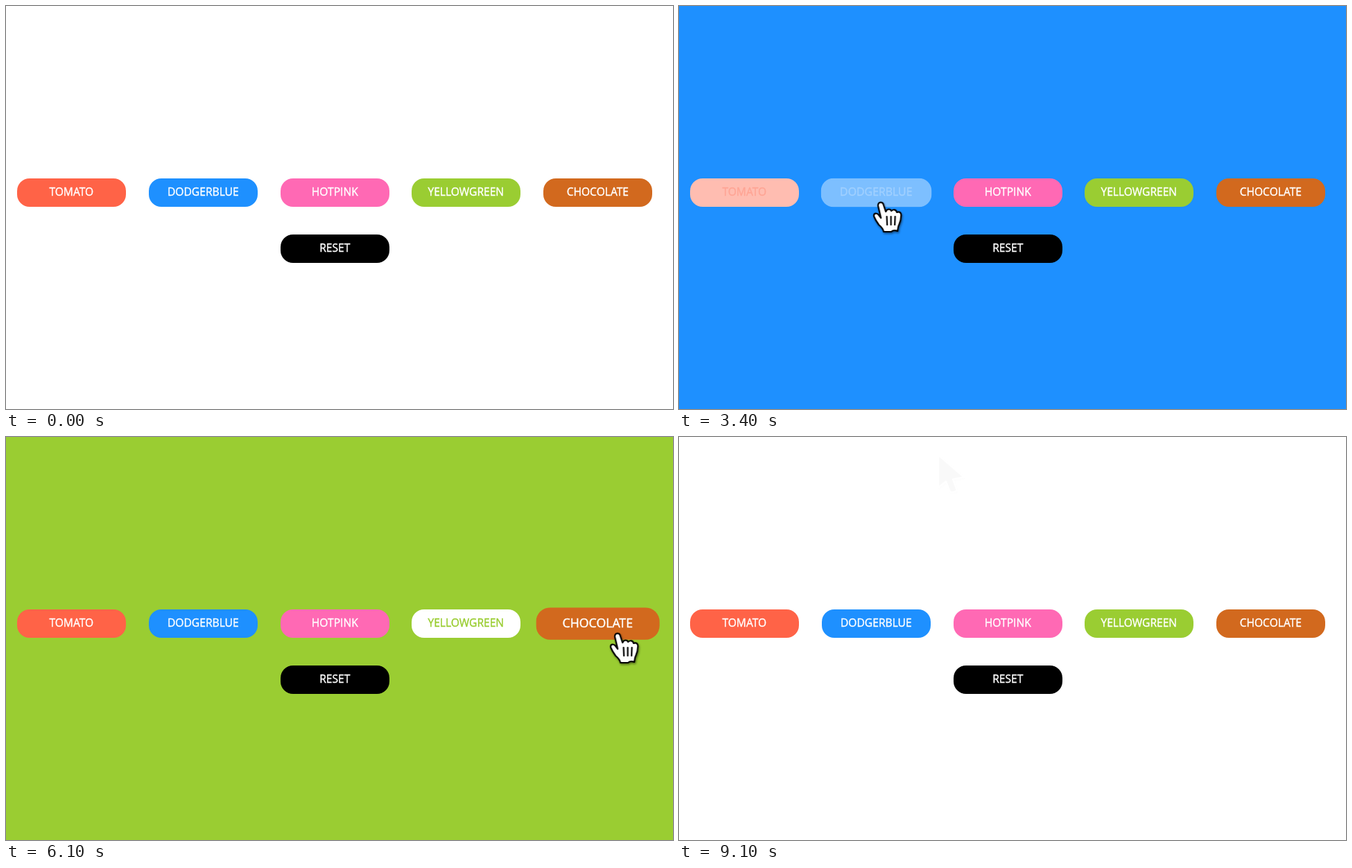
Write an HTML page that moves like this. It is 962 px wide and 582 px high and loops after 9.4 s.

```html
<!DOCTYPE html>
<html lang="en">
<head>
<meta charset="utf-8">
<title>Color buttons</title>
<style>
  html, body { margin: 0; width: 100%; height: 100%; overflow: hidden; background: #fff; }
  #stage { position: relative; width: 962px; height: 582px; overflow: hidden; }
  .button {
    position: absolute; top: 249px; width: 156.6px; height: 41px; border-radius: 18px;
    font: 500 15.6px/39px "Open Sans", "Noto Sans", sans-serif;
    -webkit-text-stroke: .4px currentColor;
    text-align: center; color: #fff;
  }
  #tip {
    position: absolute; left: 105px; top: 297px; box-sizing: border-box; width: 254px; height: 19px;
    padding-left: 3px; border-radius: 2px; background: #58595a; color: #fff; white-space: nowrap;
    font: 500 12.55px/17px "Noto Sans CJK KR", "Noto Sans CJK", sans-serif;
    box-shadow: 1px 2px 4px rgba(0, 0, 0, .5); opacity: 0;
  }
  #cursor { position: absolute; left: 0; top: 0; width: 1px; height: 1px; overflow: visible; }
  #hand, #arrow { stroke-linejoin: round; stroke-linecap: round; opacity: 0; }
  #hand { fill: #fff; stroke: #000; stroke-width: 2.2; filter: drop-shadow(1px 2px 1.5px rgba(0, 0, 0, .45)); }
  #arrow { fill: #000; stroke: #fff; stroke-width: 2.5; filter: drop-shadow(1px 2px 1.5px rgba(0, 0, 0, .4)); }
</style>
</head>
<body>
<div id="stage">
  <div id="tip" lang="ko">TOMATO: 토마토, 토마토 색, 빨간색, 여자, 소녀</div>
  <svg id="cursor">
    <path id="arrow" d="M1 1V48L12 39L18 54Q23 56 28 52L22 36L38 33Z"/>
    <g id="hand" transform="translate(-.8 -1)">
      <path d="M-4 5C-5-2 3-2 4 4L7 13C9 8 14 9 15 12C18 9 22 10 23 14C27 12 30 15 29 20C29 28 26 31 25 35L24 41Q18 39 15 42L4 42Q3 37-3 32C-6 28-8 25-10 20C-11 15-6 14-3 18L0 22Z"/>
      <path d="M8.5 20L9 32M14.5 20V32M20.5 20L20 32"/>
    </g>
  </svg>
</div>
<script>
  const LOOP = 9400, FADE = 500, GROW = 1.135;
  const stage = document.getElementById("stage");
  const tip = document.getElementById("tip");
  const sheet = document.head.appendChild(document.createElement("style"));

  // Rows are [time in ms, declarations, easing towards the next row].
  function animate(id, rows) {
    const all = [[0, rows[0][1]], ...rows, [LOOP, rows[rows.length - 1][1]]];
    const frames = all.map(([ms, css, ease = "linear"]) =>
      `${(ms / LOOP * 100).toFixed(3)}%{${css};animation-timing-function:${ease}}`).join("");
    sheet.textContent += `@keyframes ${id}{${frames}}`;
    return `${id} ${LOOP}ms linear infinite`;
  }

  const scale = k => `transform:scale(${k})`;

  function addButton(name, left, color) {
    const el = document.createElement("div");
    el.className = "button";
    el.textContent = name;
    el.style.left = left + "px";
    el.style.backgroundColor = color;
    stage.insertBefore(el, tip);
    return el;
  }

  const buttons = [
    { color: "tomato", hover: 1080, down: 1600, click: 1718 },
    { color: "dodgerblue", hover: 2595, down: 3110, click: 3273 },
    { color: "hotpink", hover: 3720, down: 4200, click: 4257 },
    { color: "yellowgreen", hover: 4720, down: 5230, click: 5330 },
    { color: "chocolate", hover: 5590, down: 6150, click: 6250 }
  ];
  const resetClick = 7380;

  buttons.forEach(({ color, hover, down, click }, i) => {
    const el = addButton(color.toUpperCase(), 16.4 + 189.65 * i, color);
    const off = i < 4 ? buttons[i + 1].click : resetClick;
    const plain = `background-color:${color};color:#fff`;
    const active = `background-color:#fff;color:${color}`;
    el.style.animation = [
      animate(color + "-size", [
        [hover, scale(1), "ease"], [Math.min(hover + FADE, down - 1), scale(GROW)],
        [down, scale(GROW), "ease"], [down + FADE, scale(1)]
      ]),
      animate(color + "-fill", [
        [click, plain, "ease"], [click + FADE, active],
        [off, active, "ease"], [off + FADE, plain]
      ])
    ].join();
  });

  const reset = addButton("RESET", 395.7, "#000");
  reset.style.top = "330px";
  reset.style.animation = animate("reset-size", [
    [7050, scale(1), "ease"], [7280, scale(GROW), "ease"], [resetClick, scale(1.08), "ease"],
    [7800, scale(GROW)], [8070, scale(GROW), "ease"], [8500, scale(1)]
  ]);

  stage.style.animation = animate("backdrop", [
    [1, "background:#fff"],
    ...buttons.map(b => [b.click, `background:${b.color}`]),
    [resetClick, "background:#fff"]
  ].map(([ms, css]) => [ms, css, "step-end"]));

  tip.style.animation = animate("tip", [
    [1840, "opacity:0"], [1930, "opacity:1"], [2300, "opacity:1"], [2400, "opacity:0"]
  ]);

  const move = (ms, x, y, ease = "ease-in-out") => [ms, `transform:translate(${x}px,${y}px)`, ease];
  document.getElementById("cursor").style.animation = animate("travel", [
    move(100, 881, 479, "ease-in"), move(560, 430, 430, "ease-out"),
    move(1100, 128, 291), move(2350, 128, 291),
    move(2850, 292, 285), move(3500, 292, 285),
    move(3950, 514, 285), move(4500, 514, 285),
    move(5000, 700, 285), move(5450, 700, 285),
    move(5750, 883, 285), move(6450, 883, 285),
    move(6950, 518, 287), move(6990, 518, 287),
    move(7150, 512, 363), move(7950, 512, 363),
    move(8500, 373, 25)
  ]);

  // The pointer swaps between arrow and hand at each button edge.
  const swaps = [1070, 2530, 2595, 3680, 3720, 4655, 4720, 5550, 5590,
    6640, 6670, 6795, 6830, 7010, 7065, 8070, 8130, 8175];
  const show = (ms, on) => [ms, `opacity:${+on}`, "step-end"];
  const toggles = first => swaps.map((ms, i) => show(ms, (i % 2 === 0) === first));
  document.getElementById("hand").style.animation =
    animate("hand", [show(1, false), ...toggles(true)]);
  document.getElementById("arrow").style.animation =
    animate("arrow", [show(1, false), show(100, true), ...toggles(false), show(8580, 0.02)]);
</script>
</body>
</html>
```
